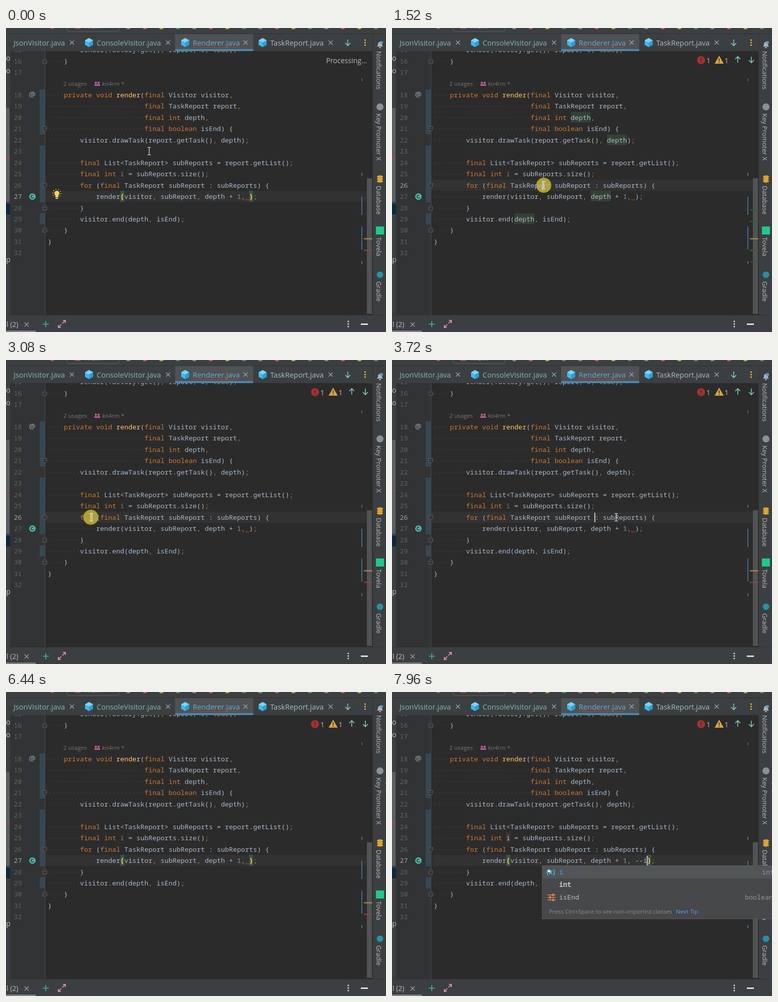
An HTML page with a canvas that plays this animation: 755x605 px, repeating every 8 s.

```html
<!DOCTYPE html>
<html lang="en">
<head>
<meta charset="utf-8">
<title>Code editor</title>
<style>
html, body { margin: 0; width: 755px; height: 605px; overflow: hidden; background: #2b2b2b }
canvas { display: block }
</style>
</head>
<body>
<canvas id="stage" width="755" height="605"></canvas>
<script>
const g = document.getElementById('stage').getContext('2d');
const LOOP = 8000, LEFT = 83, CW = 8, FIRST = 15;
const MONO = '"Noto Sans Mono", "DejaVu Sans Mono", monospace';
const UI = '"Open Sans", "Noto Sans", sans-serif';
const TEXT = '#a9b7c6', KEY = '#cc7832', PANEL = '#3c3f41', LABEL = '#bbbbbb', TEAL = '#80cbc4';

const pad = n => ' '.repeat(n);
const code = [
  pad(8) + 'render(factory.get(), report, 0, true);',
  pad(4) + '}',
  '',
  pad(4) + 'private void render(final Visitor visitor,',
  pad(24) + 'final TaskReport report,',
  pad(24) + 'final int depth,',
  pad(24) + 'final boolean isEnd) {',
  pad(8) + 'visitor.drawTask(report.getTask(), depth);',
  '',
  pad(8) + 'final List<TaskReport> subReports = report.getList();',
  pad(8) + 'final int i = subReports.size();',
  pad(8) + 'for (final TaskReport subReport : subReports) {',
  pad(12) + 'render(visitor, subReport, depth + 1, );',
  pad(8) + '}',
  pad(8) + 'visitor.end(depth, isEnd);',
  pad(4) + '}',
  '}',
  ''
];
const keywords = /^(private|void|final|int|boolean|for|true|[,;])$/;

// The mouse visits text positions; a stop with a word is a click that selects that word.
const stops = [
  { t: 0, row: 23, col: 25.1 },
  { t: 1000, row: 20, col: 37, word: 'depth' },
  { t: 1480, row: 26, col: 27.2, word: 'TaskReport' },
  { t: 2320, row: 25, col: 17.5, word: 'i' },
  { t: 2520, row: 25, col: 18.4, word: 'i' },
  { t: 3000, row: 26, col: 10.6, word: '' },
  { t: 3480, row: 26, col: 40, word: '' },
  { t: 3800, row: 26, col: 45.3, word: 'subReports' },
  { t: 4360, row: 27, col: 49.5, word: '' },
  { t: 5600, row: 20.5, col: 84.2 }
];
const clicks = stops.filter(s => s.word !== undefined);
const start = { t: -560, row: 27, col: 50, word: '' };
const keyTimes = [6640, 7440, 7680];

const rowTop = n => Math.round(n > 17 ? 122 + (n - 18) * 22.45 : 54.5 + (n - 16) * 22.45);
const colX = c => LEFT + c * CW;
const lastBefore = t => clicks.findLast(s => s.t <= t) || start;

function rect(x, y, w, h, color) { g.fillStyle = color; g.fillRect(x, y, w, h); }
function text(s, x, y, color, size = 14.5, font = UI, weight = '') {
  g.font = `${weight} ${size}px ${font}`;
  g.fillStyle = color;
  g.fillText(s, x, y);
}
function mono(s, x, y, color, weight) { text(s, x, y, color, 13.333, MONO, weight); }
function disc(x, y, r, color, ry = r) {
  g.fillStyle = color;
  g.beginPath(); g.ellipse(x, y, r, ry, 0, 0, 7); g.fill();
}
function trace(p) { for (let i = 0; i < p.length; i += 2) i ? g.lineTo(p[i], p[i + 1]) : g.moveTo(p[i], p[i + 1]); }
function line(color, width, ...paths) {
  g.strokeStyle = color; g.lineWidth = width;
  g.beginPath(); paths.forEach(trace); g.stroke();
}
function poly(color, ...p) {
  g.fillStyle = color;
  g.beginPath(); trace(p); g.fill();
}
function cross(x, y) { line('#98a6ab', 1.3, [x - 4, y - 4, x + 4, y + 4], [x + 4, y - 4, x - 4, y + 4]); }
function arrow(x, y, d) { line(TEAL, 1.6, [x, y - 6 * d, x, y + 6 * d], [x - 5, y + d, x, y + 6 * d, x + 5, y + d]); }
function dots(x, y, color) { for (const d of [-5, 0, 5]) disc(x, y + d, 1.6, color); }
function wave(x, end, y) {
  const p = [];
  for (let i = 0; x + i * 2 <= end; i++) p.push(x + i * 2, y + (i % 2 ? 1 : -1));
  line('#bc3f3c', 1, p);
}
function exclaim(x, y) { rect(x - .8, y, 1.6, 5.5, '#2b2b2b'); rect(x - .8, y + 7, 1.6, 1.8, '#2b2b2b'); }

function drawFold(n, d) {
  const y = rowTop(n) + 11;
  const shape = [73, y - 4 * d, 81, y - 4 * d, 81, y + 2 * d, 77, y + 5 * d, 73, y + 2 * d, 73, y - 4 * d];
  poly('#2b2b2b', ...shape);
  line('#686b6e', 1, shape, [75, y - .5, 79, y - .5]);
}

function drawCode(lines, row, word) {
  lines.forEach((src, k) => {
    const n = k + FIRST, top = rowTop(n), base = top + 16;
    mono(n, 15.5, base, n === row ? '#a4a3a3' : '#606366');
    const indent = src.length - src.trimStart().length;
    for (let c = 0; c < indent; c++) rect(colX(c) + 3, top + 11, 1.4, 1.4, '#484b4d');
    for (const { 0: s, index } of src.matchAll(/\w+|[^\w\s]/g)) {
      const x = colX(index), unused = n === 25 && s === 'i';
      let color = keywords.test(s) ? KEY : /^\d/.test(s) ? '#6897bb' : TEXT, weight;
      if (n === 18 && s === 'render') color = '#ffc66d';
      if (s === word && (s !== 'i' || unused)) rect(x, top, s.length * CW, 21, unused ? '#40332b' : '#344134');
      else if (unused) color = '#72737a';
      if (n === 27 && row === 27 && /[()]/.test(s)) {
        rect(x, top, CW, 22, '#3b514d');
        color = '#ffef28'; weight = 'bold';
      }
      mono(s, x, base, color, weight);
    }
  });
}

function drawBulb(x, y) {
  disc(x, y - 2, 5, '#ffd54f');
  rect(x - 3, y + 2, 6, 4, '#ffd54f'); rect(x - 2.5, y + 7, 5, 2, '#d8d8d8');
  for (let a = -3.67; a < 1; a += Math.PI / 5)
    line('#ffd54f', 1.3, [x + 7 * Math.cos(a), y - 2 + 7 * Math.sin(a), x + 9 * Math.cos(a), y - 2 + 9 * Math.sin(a)]);
}

function drawStatus(busy) {
  if (busy) {
    text('Processing...', 636, 70, LABEL, 14);
    drawBulb(101, 331);
    return;
  }
  disc(614, 64, 8, '#a52f2f');
  exclaim(614, 59.5);
  poly('#d9a343', 650, 55, 659, 71, 641, 71);
  exclaim(650, 60.5);
  text('1', 624.5, 70, LABEL);
  text('1', 660.5, 70, LABEL);
  arrow(687, 63, -1);
  arrow(714, 63, 1);
}

function drawStripe(lines, word) {
  const mark = (n, color) => rect(711, 418.5 + (n - 25) * 11.5, 17, 2, color);
  for (const [y, h] of [[288, 6], [336, 36], [395, 46], [464, 6]]) rect(706, y, 2, h, '#43698d');
  rect(706, 100, 2, 6, '#3f6650');
  rect(717, 299, 10, 270, '#515253');
  mark(27, '#a33f3f');
  if (word) lines.forEach((s, k) => { if (s.match(RegExp(`\\b${word}\\b`))) mark(k + FIRST, '#27632f'); });
  mark(25, word === 'i' ? '#b0828b' : '#b98f45');
}

function drawEditor(t) {
  const typed = '--i'.slice(0, keyTimes.filter(k => k <= t).length);
  const { row, col, t: clicked } = lastBefore(t);
  const word = typed === '--i' ? 'i' : lastBefore(t - 80).word;
  const idle = t - Math.max(clicked, ...keyTimes.filter(k => k <= t));
  const lines = code.map(s => s.replace(', )', `, ${typed})`));

  rect(0, 45, 728, 526, '#2b2b2b');
  rect(8, 45, 69, 526, '#313335');
  rect(77, 45, 1, 526, '#4a4c4e');
  rect(78, rowTop(row), 639, 22, '#323232');
  for (const [a, b] of [[18, 22], [23, 28], [29, 30]]) rect(67, rowTop(a), 10, rowTop(b) - rowTop(a), '#374752');
  drawCode(lines, row, word);
  if (typed.length < 3) wave(colX(49 + typed.length), colX(50 + typed.length), 342);
  for (const n of [16, 21, 26, 28, 30]) drawFold(n, n === 21 || n === 26 ? 1 : -1);

  text('2 usages', 114, 115, '#787878', 11.5);
  for (const x of [178.5, 184]) {
    disc(x, 109, 2.2, '#c45c9a');
    rect(x - 3, 112, 6, 3, '#c45c9a');
  }
  text('ko4rm *', 191, 115, '#787878', 11.5);
  text('@', 45.5, 137, '#afb1b3', 14.5);
  disc(52.5, 335.5, 6.5, '#4bb8a4');
  g.strokeStyle = '#263836'; g.lineWidth = 1.5;
  g.beginPath(); g.arc(52.5, 335.5, 2.8, .5, 5.4); g.stroke();

  if (idle % 760 < 480) rect(colX(Math.round(col) + typed.length) - 1, rowTop(row) + 2, 2, 19, '#c4c4c4');
  drawStatus(t < 400);
  drawStripe(lines, word);
}

function drawCube(x, y) {
  poly('#40b9ee', x, y - 9, x + 8, y - 4.5, x + 8, y + 4.5, x, y + 9, x - 8, y + 4.5, x - 8, y - 4.5);
  poly('#7dd3f7', x, y - 9, x + 8, y - 4.5, x, y, x - 8, y - 4.5);
  poly('#2b9fd6', x, y, x + 8, y - 4.5, x + 8, y + 4.5, x, y + 9);
}

function drawTabs() {
  rect(0, 0, 755, 46, PANEL);
  const tints = ['#8a8d90', '#db5860', '#b5b544', '#499c54'];
  for (let i = 0; i < 16; i++) disc(243 + i * 32.8, -3, 5.5, tints[i % 4]);
  disc(92, -3, 5, '#e05555');
  g.strokeStyle = '#606468'; g.lineWidth = 1;
  g.beginPath(); g.roundRect(121.5, -15, 103, 22, 4); g.stroke();
  text('main', 157, 1, LABEL);
  rect(136, 0, 12, 1.5, '#c75450');
  rect(0, 11, 755, 1, '#2f3133');

  rect(336, 12, 155, 30, '#4e5254');
  rect(336, 42, 155, 4, '#4a88b0');
  const tabs = [['JsonVisitor', 15, 131, '#82b8b4'], ['ConsoleVisitor', 180, 322, '#82b8b4'],
    ['Renderer', 371, 476, '#6fa8d0'], ['TaskReport', 525, 645, '#a9bcc4']];
  for (const [name, x, close, color] of tabs) {
    text(name + '.java', x, 35, color);
    cross(close, 29);
    if (x > 15) drawCube(x - 15, 29);
  }
  wave(371, 462, 39);
  arrow(679, 29, 1);
  dots(713.5, 29, '#f2c037');
}

function drawLeft() {
  rect(0, 46, 8, 525, PANEL);
  rect(0, 159, 7, 187, '#5c5f61');
  rect(0, 259, 7, 2, '#b04545');
  rect(0, 350, 8, 21, '#0d293e');
  g.save();
  g.beginPath(); g.rect(0, 46, 8, 525); g.clip();
  text('o', 0, 65, LABEL);
  text('o', 0, 90, LABEL);
  text('yp', -7, 466, LABEL);
  g.restore();
}

function drawRight() {
  rect(728, 12, 27, 559, PANEL);
  rect(728, 12, 1, 559, '#323232');
  const tools = { 'Notifications': 46, 'Key Promoter X': 170, 'Database': 314, 'Tovela': 416, 'Gradle': 504 };
  for (const [name, y] of Object.entries(tools)) {
    g.save();
    g.translate(736, y); g.rotate(Math.PI / 2);
    text(name, 0, 0, LABEL, 13);
    g.restore();
  }
  poly('#afb1b3', 737, 37, 739, 34, 739, 30, 743, 27, 747, 30, 747, 34, 749, 37);
  rect(741, 38, 4, 2, '#afb1b3');
  disc(746, 29, 3, '#4a9fe0');
  disc(743, 157, 7, '#8d9092');
  for (let y = 296; y < 308; y += 4.5) disc(743, y, 6, '#e0a32e', 2.8);
  rect(735, 395, 16, 16, '#1fc98b');
  disc(743, 491, 6.5, '#2591a8');
}

function drawBottom() {
  rect(0, 571, 755, 34, PANEL);
  rect(0, 571, 755, 1, '#323232');
  rect(0, 602, 59, 3, '#777c80');
  text('l (2)', 1, 595, LABEL, 14);
  cross(41, 590);
  line('#26c6b0', 1.6, [73, 589.5, 85, 589.5], [79, 583.5, 79, 595.5]);
  for (const d of [-1, 1])
    line('#ef9ab8', 1.6, [111 + d, 589 - d, 111 + 7 * d, 589 - 7 * d],
      [111 + 2 * d, 589 - 7 * d, 111 + 7 * d, 589 - 7 * d, 111 + 7 * d, 589 - 2 * d]);
  dots(680, 589, '#dddddd');
  rect(705, 588, 14, 3, '#dddddd');
}

function drawPopup() {
  rect(298, 345, 457, 107, '#55585a');
  rect(299, 346, 456, 105, '#46484a');
  rect(299, 346, 456, 25, '#515557');
  text('(x)', 307, 363, '#40b6e0', 13.5, UI, 'bold');
  text('*', 308, 364, '#ffffff', 15, UI, 'bold');
  mono('i', 332, 363, '#589df6');
  mono('int', 332, 388, '#c5c8ca', 'bold');
  mono('isEnd', 332, 413, LABEL);
  mono('int', 735, 363, '#929496');
  mono('boolean', 701, 413, '#929496');
  for (let i = 0; i < 3; i++) {
    rect(309, 403 + i * 5, 16, 1.6, '#e08855');
    rect(i % 2 ? 313 : 319, 401 + i * 5, 2.5, 5.5, '#e08855');
  }
  text('Press Ctrl+Space to see non-imported classes', 312, 441, '#8c8c8c', 11.6);
  text('Next Tip', 564, 441, '#589df6', 11.6);
}

// Each move lasts up to 280 ms and ends 80 ms before the stop's own time.
function drawMouse(t) {
  const next = stops.findIndex(s => s.t > t);
  const b = stops.at(next), a = next > 0 ? stops[next - 1] : b;
  const end = b.t - 80, begin = Math.max(a.t, end - 280);
  const f = Math.min(1, Math.max(0, (t - begin) / (end - begin)));
  const at = s => [colX(s.col), rowTop(s.row) + (s.row === 25 ? 9 : 11)];
  const [p, q] = [at(a), at(b)];
  const x = Math.round(p[0] + (q[0] - p[0]) * f) + .5, y = Math.round(p[1] + (q[1] - p[1]) * f);
  if (clicks.some(s => t >= s.t && t < s.t + 200)) {
    g.globalCompositeOperation = 'lighten';
    disc(x, y, 15, '#afa119');
    g.globalCompositeOperation = 'source-over';
  }
  const serif = d => [x - 3.5, y + 7.5 * d, x - 1, y + 7.5 * d, x, y + 6.5 * d, x + 1, y + 7.5 * d, x + 3.5, y + 7.5 * d];
  line('#e2e2e2', 1.2, [x, y - 7, x, y + 7], serif(-1), serif(1));
}

function frame(now) {
  const t = Math.floor(now % LOOP / 40) * 40;
  drawEditor(t);
  drawTabs();
  drawLeft();
  drawRight();
  drawBottom();
  if (t >= 7840) drawPopup();
  drawMouse(t);
  requestAnimationFrame(frame);
}
requestAnimationFrame(frame);
</script>
</body>
</html>
```
